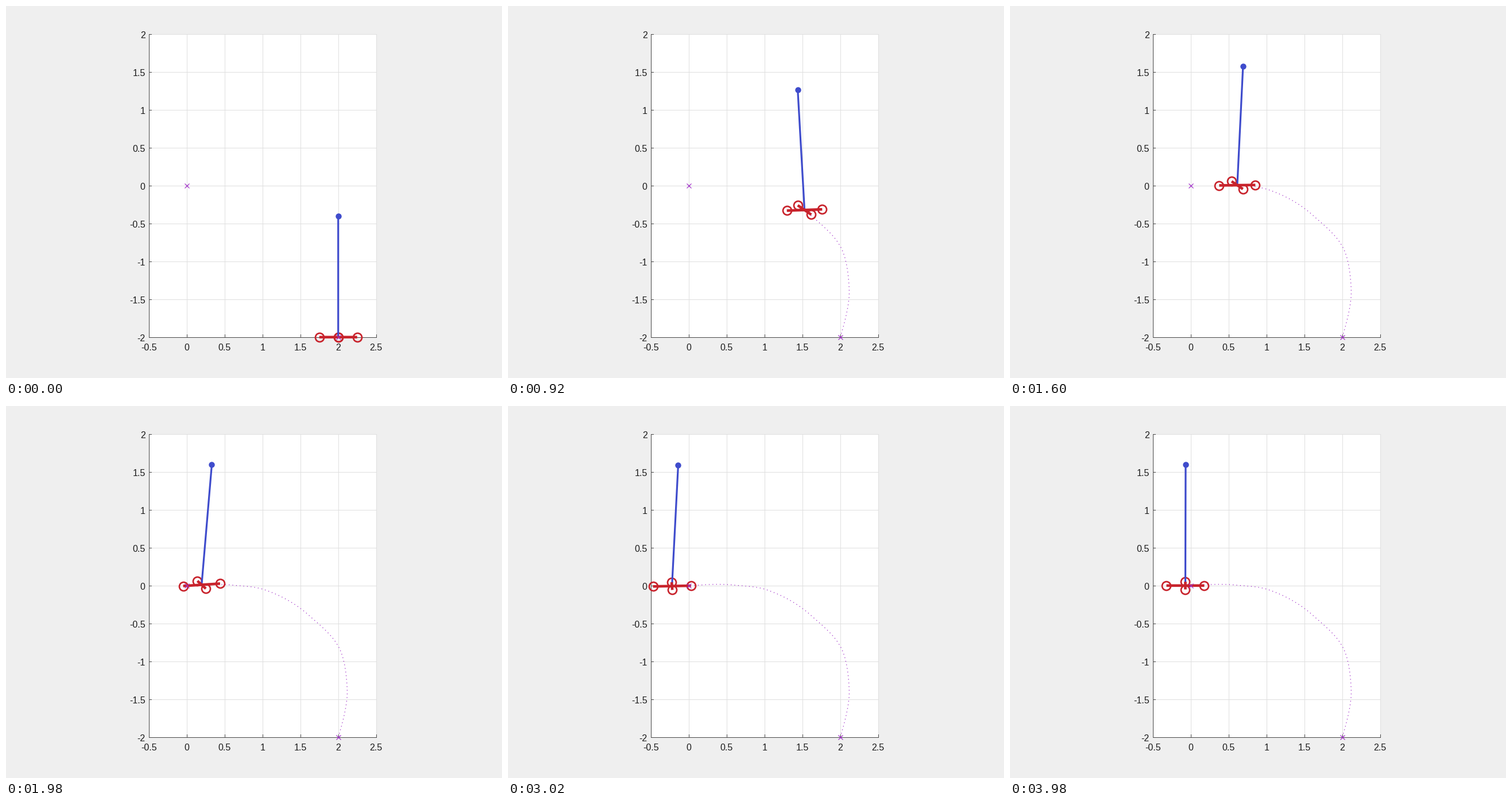
Write a matplotlib script that moves like this. It is 864x648 px and loops after 4 s.

```python
import numpy as np
import matplotlib.pyplot as plt
from matplotlib.animation import FuncAnimation

W, H, DPI = 864, 648, 100
FRAMES, STEP = 200, 20
PX = 72 / DPI  # points per pixel
UNIT, X0, Y0 = 132, 314.7, 312.8
ROD, ARM = 1.6, 0.25
BLUE, RED, PURPLE = "#3f4ccc", "#c8232c", "#a02fc8"
INK, GRID, AXIS = "#1c1c1c", "#dfdfdf", "#484848"

plt.rcParams["font.family"] = "Liberation Sans"
plt.rcParams["axes.unicode_minus"] = False


def px(x):
    return X0 + UNIT * x


def py(y):
    return Y0 - UNIT * y


def glide(now, keys):
    """Smooth path through (ms, x, y) keys, starting from rest."""
    k = np.array(keys, float)
    t, p = k[:, 0], k[:, 1:]
    m = np.gradient(p, t, axis=0)
    m[0] = 0
    i = np.clip(np.searchsorted(t, now, side="right") - 1, 0, len(t) - 2)
    h = (t[i + 1] - t[i])[:, None]
    s = (now - t[i])[:, None] / h
    return ((1 + 2 * s) * (1 - s) ** 2 * p[i] + s * (1 - s) ** 2 * h * m[i]
            + s * s * (3 - 2 * s) * p[i + 1] + s * s * (s - 1) * h * m[i + 1])


def bump(mid, width):
    return np.exp(-((now - mid) / width) ** 2)


now = np.arange(FRAMES) * STEP
body = glide(now, [
    (0, 2, -2), (320, 2.119, -1.39), (540, 2.038, -0.88), (850, 1.625, -0.403),
    (1280, 1.027, -0.055), (1600, 0.615, 0.005), (2380, -0.108, -0.011),
    (2700, -0.216, -0.01), (3240, -0.195, -0.004), (3980, -0.07, 0)])

# One strong swing, then a slow correction; everything starts upright
rise = 1 - np.exp(-(now / 150) ** 2)
swing = bump(590, 290)
lean = rise * (0.159 * bump(2330, 850) - 0.363 * swing)
depth = rise * (0.3 * bump(1600, 500) + 0.62 * swing)
yaw = rise * (0.31 * bump(1450, 930) + 0.52 * swing)
pitch = rise * (0.205 + 0.16 * swing)
roll = rise * (0.11 * bump(2350, 500) + 0.23 * bump(520, 290))

pole = np.column_stack([lean, np.sqrt(ROD ** 2 - lean ** 2 - depth ** 2)])
halves = [ARM * np.column_stack([np.cos(yaw), np.sin(roll)]),
          ARM * np.column_stack([np.sin(yaw), -np.sin(pitch)])]

fig = plt.figure(figsize=(W / DPI, H / DPI), dpi=DPI, facecolor="#efefef")
ax = fig.add_axes([0, 0, 1, 1])
ax.set(xlim=(0, W), ylim=(H, 0))
ax.axis("off")


def line(xs, ys, color, width, z, **kw):
    return ax.plot(xs, ys, color=color, lw=width * PX, zorder=z, **kw)[0]


def label(x, y, value, ha):
    ax.text(x, y, f"{value:g}", ha=ha, va="center_baseline", color=INK,
            fontsize=16 * PX, zorder=3)


def place(artist, points):
    artist.set_data(px(points[:, 0]), py(points[:, 1]))


left, right, top, bottom = px(-0.5), px(2.5), py(2), py(-2)
ax.fill([left, right, right, left], [top, top, bottom, bottom], "white", zorder=0)
for v in np.arange(-0.5, 2.6, 0.5):
    line([px(v)] * 2, [top, bottom], GRID, 1, 1)
    line([px(v)] * 2, [bottom, bottom - 4.5], AXIS, 1, 2)
    label(px(v), 593.5, v, "center")
for v in np.arange(-2, 2.1, 0.5):
    line([left, right], [py(v)] * 2, GRID, 1, 1)
    line([left, left + 4.5], [py(v)] * 2, AXIS, 1, 2)
    label(242.7, py(v) + 0.7, v, "right")
line([left, left], [top, bottom], AXIS, 1, 2)
line([left, right], [bottom, bottom], AXIS, 1, 2)

trail = line([], [], PURPLE, 1.3, 4, linestyle=(0, (1, 3.9)))
rotors = line([], [], RED, 0, 5, marker="o", ms=15 * PX, mfc="none",
              mew=2.7 * PX, snap=False)
rod = line([], [], BLUE, 3.2, 6, snap=False, solid_capstyle="butt")
tip = line([], [], BLUE, 0, 6, marker="o", ms=10.4 * PX, mew=0, snap=False)
arms = [line([], [], RED, 4.6, 7, snap=False, solid_capstyle="butt")
        for _ in halves]
line([px(0), px(2)], [py(0), py(-2)], PURPLE, 0, 8, marker="x",
     ms=8 * PX, mew=1.2 * PX)


def draw(i):
    c = body[i]
    spans = [np.array([c - half[i], c + half[i]]) for half in halves]
    place(trail, body[:i + 1])
    place(rod, np.array([c, c + pole[i]]))
    place(tip, np.array([c + pole[i]]))
    place(rotors, np.vstack(spans))
    for arm, span in zip(arms, spans):
        place(arm, span)
    return [trail, rotors, rod, tip, *arms]


anim = FuncAnimation(fig, draw, frames=FRAMES, interval=STEP, repeat=True,
                     repeat_delay=0, blit=False)
plt.show()
```
